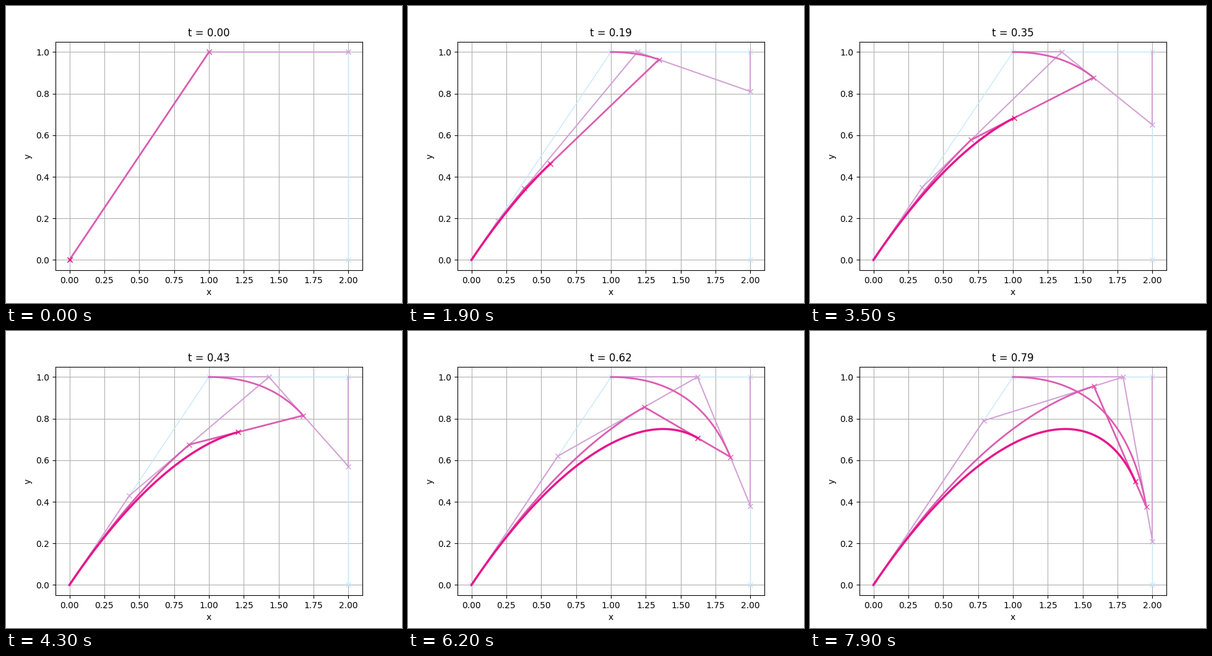
A matplotlib script that plays this animation: 640x480 px, repeating every 8 s.

```python
import numpy as np
import matplotlib.pyplot as plt
from matplotlib.animation import FuncAnimation

FRAMES = 80
STEP = 0.01
CONTROL = np.array([(0, 0), (1, 1), (2, 1), (2, 0)], float)
DEGREE = len(CONTROL) - 1
COLD = np.array([199, 232, 252]) / 255
HOT = np.array([231, 22, 139]) / 255


def casteljau(t):
    """Point sets of every interpolation level at parameter t."""
    levels = [CONTROL]
    while len(levels[-1]) > 1:
        p = levels[-1]
        levels.append((1 - t) * p[:-1] + t * p[1:])
    return levels


history = [casteljau(i * STEP) for i in range(FRAMES)]

fig, ax = plt.subplots(figsize=(6.4, 4.8), dpi=100)
ax.set(xlim=(-0.1, 2.1), ylim=(-0.05, 1.05), xlabel="x", ylabel="y")
ax.set_xticks(np.arange(0, 2.01, 0.25))
ax.grid(True)
title = ax.set_title("t = 0.00")

polygons, trails = [], []
for level in range(DEGREE + 1):
    style = dict(color=COLD + (HOT - COLD) * level / DEGREE,
                 lw=1 + 0.5 * level)
    polygons.append(ax.plot([], [], marker="x", **style)[0])
    count = DEGREE + 1 - level if level else 0
    trails.append([ax.plot([], [], **style)[0] for _ in range(count)])


def update(i):
    for level, points in enumerate(history[i]):
        polygons[level].set_data(points[:, 0], points[:, 1])
        for k, trail in enumerate(trails[level]):
            path = np.array([h[level][k] for h in history[:i + 1]])
            trail.set_data(path[:, 0], path[:, 1])
    title.set_text(f"t = {i * STEP:.2f}")
    return []


anim = FuncAnimation(fig, update, frames=FRAMES, interval=100,
                     repeat=True, repeat_delay=0, blit=False)
plt.show()
```
